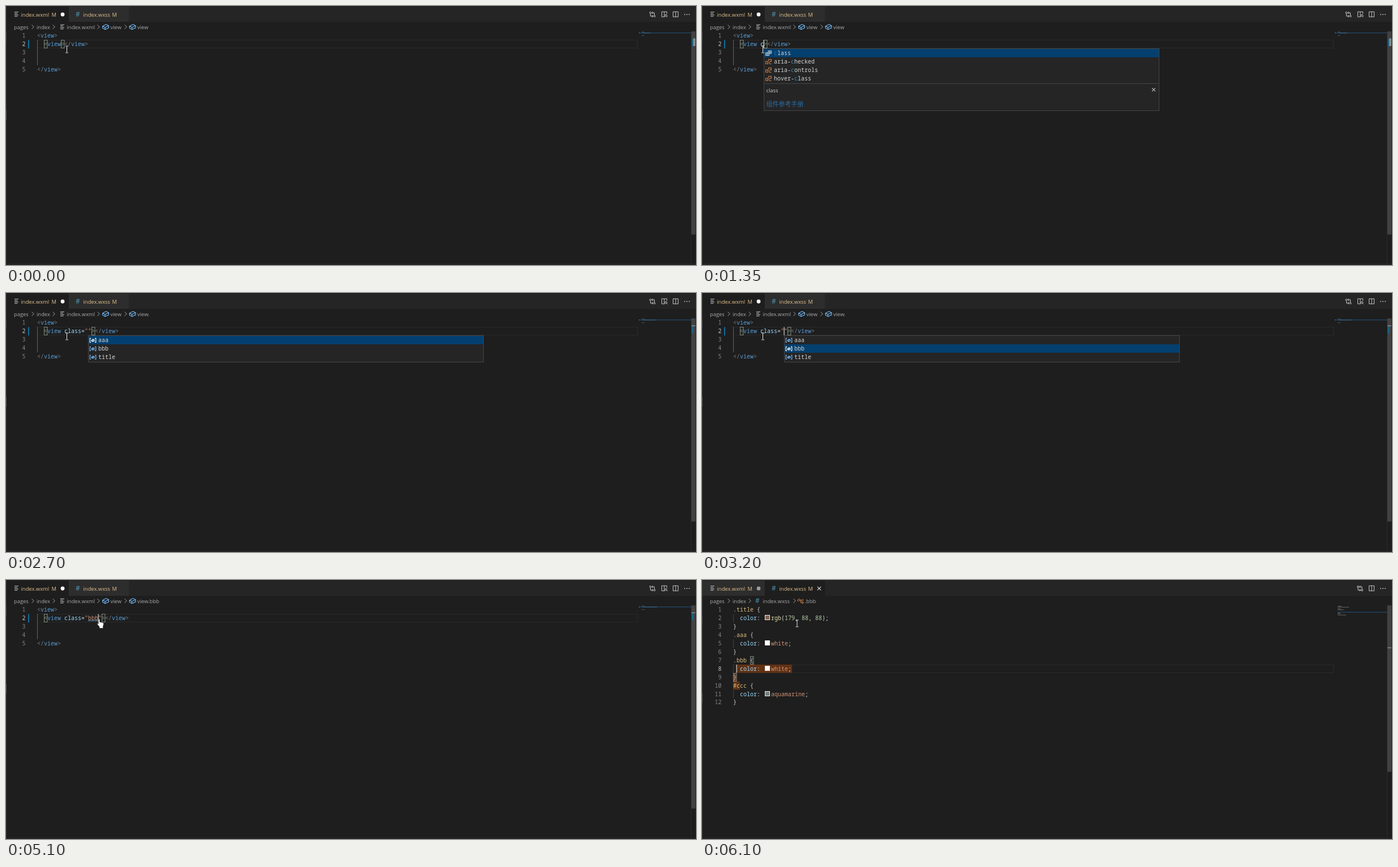
Recreate the animation shown at these times as an HTML page. Size 1219 px wide and 459 px high, loop 6250 ms.

```html
<!DOCTYPE html>
<html lang="en">
<head>
<meta charset="utf-8">
<title>Class name completion</title>
<style>
  html, body { margin: 0; width: 100%; height: 100%; overflow: hidden; background: #1e1e1e; }
  svg { display: block; width: 100%; height: 100%; }
  text { white-space: pre; }
  .mono { font: 10px "Noto Sans Mono", "DejaVu Sans Mono", monospace; }
  .list { font-weight: 500; }
  .ui { font: 9.4px "Open Sans", "Noto Sans", sans-serif; }
  .cjk { font: 11px "Noto Sans CJK SC", "Noto Sans CJK", sans-serif; }
</style>
</head>
<body>
<svg id="stage" viewBox="0 0 1219 459"></svg>
<script>
const LOOP = 6250, LEFT = 55, CHAR = 6, ROW = 14.93;
const color = {
  punct: '#808080', tag: '#569cd6', attr: '#9cdcfe', plain: '#d4d4d4', str: '#ce9178',
  sel: '#d7ba7d', fn: '#dcdcaa', num: '#b5cea8', mod: '#e2c08d', hash: '#519aba',
  icon: '#c5c5c5', crumb: '#a9a9a9', blue: '#75beff', orange: '#e08a4f', picked: '#04406f'
};

// Each step changes part of the state from its time on.
const steps = [
  [0, { typed: '', caret: 0, list: '', pick: 0, crumb: 'view', ibeam: 1, hand: 0, hover: 0, css: 0 }],
  [200, { caret: 1 }],
  [750, { typed: ' ' }],
  [1300, { typed: ' c' }],
  [1350, { list: 'attributes' }],
  [1800, { caret: 0 }],
  [2100, { typed: ' class=""', caret: 1, list: 'classes' }],
  [2500, { crumb: 'view.' }],
  [2650, { caret: 0 }],
  [3100, { caret: 1, pick: 1 }],
  [3700, { typed: ' class="bbb"', list: '' }],
  [4200, { crumb: 'view.bbb' }],
  [4250, { caret: 0 }],
  [4550, { hand: 1 }],
  [4700, { ibeam: 0, caret: 1 }],
  [5150, { hover: 1 }],
  [5250, { caret: 0 }],
  [5750, { caret: 1, hover: 0 }],
  [6000, { css: 1 }]
];

const esc = s => s.replace(/&/g, '&amp;').replace(/</g, '&lt;');
const rect = (x, y, w, h, fill, extra = '') =>
  `<rect x="${x}" y="${y}" width="${w}" height="${h}" fill="${fill}" ${extra}/>`;
const frame = (x, y, w, h, stroke, fill = 'none') =>
  rect(x + .5, y + .5, w - 1, h - 1, fill, `stroke="${stroke}"`);
const path = (d, stroke, width = 1, fill = 'none') =>
  `<path d="${d}" stroke="${stroke}" stroke-width="${width}" fill="${fill}"/>`;
const text = (x, y, s, fill, cls = 'ui', extra = '') =>
  `<text x="${x}" y="${y}" fill="${fill}" class="${cls}" ${extra}>${esc(s)}</text>`;
const at = (x, y, s) => `<g transform="translate(${x} ${y})">${s}</g>`;

const rowTop = r => 45.4 + ROW * (r - 1);
const colX = c => LEFT + CHAR * c;

// Tokens alternate between a colour name and its text.
function tokens(x, y, list, cls = 'mono') {
  let out = '';
  for (let i = 0; i < list.length; i += 2) {
    out += text(x, y, list[i + 1], color[list[i]], cls);
    x += list[i + 1].length * CHAR;
  }
  return out;
}
const line = (row, col, ...list) => tokens(colX(col), rowTop(row) + 10.8, list);
const bracketBox = (row, col) => frame(colX(col), Math.round(rowTop(row)), 6.5, 15, '#888', '#1d271d');
const caretAt = (row, col) => rect(colX(col) - .5, rowTop(row), 1.2, 14.5, '#d8d8d0');

function lineNumbers(count, active) {
  let out = '';
  for (let n = 1; n <= count; n++)
    out += text(34.5, rowTop(n) + 10.8, `${n}`, n === active ? '#c6c6c6' : '#858585', 'mono', 'text-anchor="end"');
  return out;
}
const activeLine = row => frame(LEFT, Math.round(rowTop(row)), 1061, 15, '#2a2a2a');

// Icons are drawn around their own centre.
const lines = (x, y) => at(x, y, path('M-3.5-3.7H3.5M-3.5-1.2H1.5M-3.5 1.2H3.5M-3.5 3.7H2', '#c5c8c6', 1.1));
const chevron = x => at(x, 37, path('M-2-3.6L1.8 0L-2 3.6', '#a0a0a0'));
const cube = x => at(x, 37, path('M-5.3-1.2L1-4.5L5.4-2.2V1.8L-1 4.7L-5.3 2.3ZM-5.3-1.2L-1 1L5.4-2.2M-1 1V4.7', color.blue, 1.1));
const classIcon = (x, y, c) => at(x, y, path('M-5-1L-2-4L0-2L-3 1ZM-1-1H2M1 0V3H3M2-1L4-3L5.5-1.5L3.5 .5ZM3 3L4.5 1.5L6 3L4 5Z', c));
const enumIcon = (x, y, c) => at(x, y, path('M-.5-4H5V.5H-.5ZM1-2.4H3.6M1-.9H3.6M-.5-.8H-5V4H1V.5M-3.5 1H-1M-3.5 2.5H-1', c));
const propIcon = (x, y) => at(x, y, path('M-5-.5H-1V4H-5ZM0-4H5V0H2M0-4V-1M1.5 0V4H5M-3.5 1.5H-2.2M2-2.5L3.7-1', color.orange, .9));
const valueIcon = (x, y, c) => at(x, y, path('M-3.5-3.5H-5.3V3.5H-3.5M3.5-3.5H5.3V3.5H3.5M-2.5 0L0-2L2.5-1L2.5 1L0 2.2L-2.5 1ZM-2 1.5L2-1.5', c, 1.1));
const close = (x, y, r, c) => at(x, y, path(`M${-r} ${-r}L${r} ${r}M${r} ${-r}L${-r} ${r}`, c, 1.1));
const compare = x => at(x, 15, path('M-3.5-1.5V3H1M-1 1L1 3L-1 5M3.5 1.5V-3H-1M1-5L-1-3L1-1', color.icon)
  + `<g fill="none" stroke="${color.icon}"><circle cx="-3.5" cy="-3" r="1.5"/><circle cx="3.5" cy="3" r="1.5"/></g>`);
const split = x => at(x, 14.7, path('M-4.5-4.5H4.5V4.5H-4.5ZM0-4.5V4.5', color.icon));
const preview = x => at(x, 14.7, path('M4.5-1V-4.5H-4.5V4.5H1M0-4.5V4.5M5.5 5L3.8 3.4', color.icon)
  + `<circle cx="3" cy="2" r="1.7" fill="none" stroke="${color.icon}"/>`);
const dots = x => [-4, 0, 4].map(d => `<circle cx="${x + d}" cy="15" r=".9" fill="${color.icon}"/>`).join('');
const ibeam = x => at(x, 77, path('M-2.5-6H-.8L0-5.3L.8-6H2.5M0-5.3V5.3M-2.5 6H-.8L0 5.3L.8 6H2.5', '#e8e8e8'));
const hand = at(167, 77, path('M-3.8-7Q-2.5-8.5-1.3-7V-2.5L3.8-1.5Q5.8-1 5.6 1L4.5 5V8.5H-2V6L-5.2 2Q-6.5 0-5-.4L-3.8 .7Z', '#222', .6, '#fff'));

function chrome(css) {
  const active = '#1e1e1e', idle = '#2d2d2d';
  return rect(0, 0, 1219, 459, '#1e1e1e') + rect(0, 1, 1219, 27, '#252526')
    + rect(0, 1, 110.5, 27, css ? idle : active) + rect(111, 1, 106.5, 27, css ? active : idle)
    + lines(18.5, 14.5) + text(26.5, 18.5, 'index.wxml', color.mod) + text(80.5, 18.5, 'M', color.mod)
    + `<circle cx="100" cy="15" r="3.4" fill="${css ? '#9b9b9b' : '#fff'}"/>`
    + text(123, 18.5, '#', color.hash, 'ui', 'font-weight="700" style="font-size:12px"')
    + text(136.5, 18.5, 'index.wxss', color.mod) + text(187.5, 18.5, 'M', color.mod)
    + (css ? close(207, 15, 3.2, '#e8e8e8') + compare(1162.5) + split(1183)
           : compare(1142) + preview(1163) + split(1183)) + dots(1203)
    + text(14, 40.8, 'pages', color.crumb) + chevron(47.5) + text(54, 40.8, 'index', color.crumb)
    + chevron(84.5) + chevron(163.5)
    + rect(0, 0, 1, 459, '#303030') + rect(0, css ? 63 : 46, 1, 17, '#444')
    + rect(0, css ? 201 : 184, 1, 17, '#555') + rect(0, 457, 1219, 1, '#2a2a2a')
    + rect(1210, 45, 1, 412, '#2b2b2b') + rect(1211, 45, 7, css ? 295 : 360, '#424242');
}

function popup(x, rows, height, pick, item) {
  let out = frame(x, 75, 699, height, '#454545', '#252526') + rect(x + 1, 76 + pick * ROW, 697, 14.9, color.picked);
  for (let i = 0; i < rows.length; i++) out += item(rows[i], 83.6 + i * ROW, i === pick);
  return out;
}

function attributeList() {
  const x = 109;
  const item = (name, y, on) => {
    const c = name.lastIndexOf('c', 6);
    const parts = ['plain', name.slice(0, c), 'match', 'c', 'plain', name.slice(c + 1)];
    color.match = on ? '#1478b8' : '#1490df';
    return (on ? enumIcon(117.5, y, '#d8e4ee') : propIcon(117.5, y)) + tokens(127, y + 3.5, parts, 'mono list');
  };
  return popup(x, ['class', 'aria-checked', 'aria-controls', 'hover-class'], 111, 0, item)
    + rect(x, 137, 699, 1, '#454545') + text(113.5, 152.5, 'class', '#ccc') + close(798, 148.3, 3, '#c5c5c5')
    + text(113.5, 178.3, '组件参考手册', '#2a6da3', 'cjk');
}

const classList = pick => popup(145, ['aaa', 'bbb', 'title'], 48, pick, (name, y, on) =>
  valueIcon(153.5, y + .3, on ? '#fff' : color.blue) + text(163, y + 3.5, name, color.plain, 'mono list'));

function definitionHover() {
  const rows = [
    ['plain', '  ', 'attr', 'color', 'plain', ': ', 'str', 'white', 'plain', ';'],
    ['plain', '}'],
    ['sel', '#ccc', 'plain', ' {'],
    ['plain', '  ', 'attr', 'color', 'plain', ': ', 'str', 'aquamarine', 'plain', ';'],
    ['plain', '}']
  ];
  return frame(145, 75, 132, 82, '#454545', '#252526')
    + rows.map((r, i) => tokens(150, 89.5 + i * ROW, r)).join('');
}

function markupView(s) {
  const end = 7 + s.typed.length;
  const quoted = s.typed.indexOf('"');
  const attr = quoted < 0 ? s.typed : s.typed.slice(0, quoted - 1);
  const value = quoted < 0 ? '' : s.typed.slice(quoted);
  const caretCol = value ? end - 1 : end;
  return chrome(0) + lines(99.5, 37) + text(107.5, 40.8, 'index.wxml', color.crumb)
    + cube(176) + text(184.5, 40.8, 'view', color.crumb) + chevron(211.5)
    + cube(223.5) + text(232, 40.8, s.crumb, color.crumb)
    + lineNumbers(5, 2) + activeLine(2) + rect(39, 60.3, 2, 15, '#0c6f9d')
    + rect(55, 60, 1, 45, '#666') + bracketBox(2, 2) + bracketBox(2, end)
    + line(1, 0, 'punct', '<', 'tag', 'view', 'punct', '>')
    + line(2, 2, 'punct', '<', 'tag', 'view', 'attr', attr, 'plain', value && '=', 'str', value,
        'punct', '></', 'tag', 'view', 'punct', '>')
    + line(5, 0, 'punct', '</', 'tag', 'view', 'punct', '>')
    + (s.hand ? rect(145, 71.6, 18, 1, color.tag) : '')
    + rect(1118, 47, 93, 1.3, '#21496b') + rect(1123, 45.5, 5, 1, '#365572')
    + rect(1125, 47.3, end + 6, 1, '#3f6c92') + rect(1118, 47, 1.5, 1.3, '#2d81b8') + rect(1123, 52, 5, 1, '#365572')
    + rect(1212, 58, 2.5, 13.5, '#1b6685')
    + (value ? rect(1211, 57.5, 7, 1.2, '#999') : rect(1214, 57.5, 4, 13.5, '#85898c'))
    + (s.caret ? caretAt(2, caretCol) : '')
    + (s.list === 'attributes' ? attributeList() : s.list === 'classes' ? classList(s.pick) : '')
    + (s.hover ? definitionHover() : '')
    + (s.ibeam ? ibeam(107.5) : '') + (s.hand ? hand : '');
}

function declaration(row, fill, ...value) {
  const y = rowTop(row);
  return rect(55, y, 1, ROW, '#404040') + line(row, 2, 'attr', 'color', 'plain', ':')
    + frame(111, Math.round(y + 2), 9, 9, '#eee', fill) + tokens(122, y + 10.8, [...value, 'plain', ';']);
}

function styleView() {
  const rule = (row, name) => line(row, 0, 'sel', name, 'plain', ' {') + line(row + 2, 0, 'plain', '}');
  const found = (row, col, width) => rect(colX(col), rowTop(row), width, 14.6, '#613214');
  const mini = [[0, 7], [1.7, 20], [4.5, 6], [6.2, 11], [11.5, 4], [13, 5], [15.5, 15]];
  return chrome(1) + text(94, 41, '#', color.hash, 'ui', 'font-weight="700" style="font-size:12px"')
    + text(107.5, 40.8, 'index.wxss', color.crumb) + classIcon(173.5, 37, color.orange) + text(181.5, 40.8, '.bbb', color.crumb)
    + lineNumbers(12, 8) + activeLine(8)
    + found(8, 1, 98) + found(9, 0, 6) + found(10, 0, 12) + bracketBox(7, 5) + frame(55, 165, 6.5, 15, '#888')
    + rule(1, '.title') + rule(4, '.aaa') + rule(7, '.bbb') + rule(10, '#ccc')
    + declaration(2, '#85604f', 'fn', 'rgb', 'plain', '(', 'num', '179', 'plain', ', ', 'num', '88', 'plain', ', ', 'num', '88', 'plain', ')')
    + declaration(5, '#fff', 'str', 'white') + declaration(8, '#fff', 'str', 'white')
    + declaration(11, '#6f807a', 'str', 'aquamarine')
    + mini.map(([y, w]) => rect(1123, 46 + y, w, 1, '#626762')).join('')
    + rect(1123, 56.5, 88, 1.2, '#21496b') + rect(1211, 119.5, 7, 1.2, '#999')
    + caretAt(8, 1) + ibeam(168);
}

const stage = document.getElementById('stage');
let shown = -1;
function tick(now) {
  const t = now % LOOP;
  const index = steps.filter(([start]) => start <= t).length - 1;
  if (index !== shown) {
    const state = Object.assign({}, ...steps.slice(0, index + 1).map(([, change]) => change));
    stage.innerHTML = state.css ? styleView() : markupView(state);
    shown = index;
  }
}
const begin = performance.now();
function loop() {
  tick(performance.now() - begin);
  requestAnimationFrame(loop);
}
loop();
</script>
</body>
</html>
```
